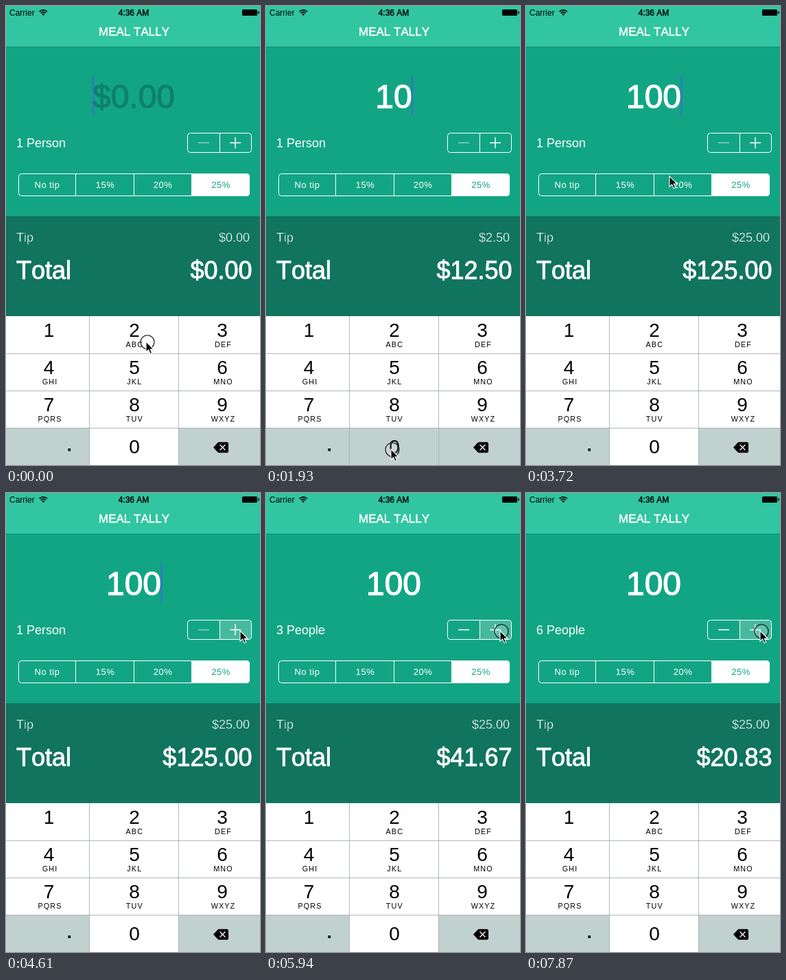
Write an HTML page that moves like this. It is 370 px wide and 666 px high and loops after 8 s.

```html
<!DOCTYPE html>
<html lang="en">
<head>
<meta charset="utf-8">
<title>Tip calculator</title>
<style>
html, body { margin: 0; width: 100%; height: 100%; overflow: hidden; background: #12a584; }
svg { display: block; width: 370px; height: 666px; }
text { font-family: "Liberation Sans", Arial, sans-serif; font-kerning: none; white-space: pre; }
.w { fill: #fff; }
.mid { text-anchor: middle; }
.end { text-anchor: end; }
.medium { stroke: #fff; paint-order: stroke; }
.light { fill: #fff; stroke: #10745e; stroke-width: .35px; font-size: 18px; }
.big { font-size: 36px; stroke-width: .9px; }
.seg { font-size: 13px; letter-spacing: .5px; }
.digit { font-size: 28px; }
.abc { font-size: 10.8px; letter-spacing: 1.1px; }
</style>
</head>
<body>
<svg viewBox="0 0 370 666">
  <rect width="370" height="666" fill="#12a584"/>
  <rect width="370" height="59" fill="#32c5a1"/>
  <rect y="59" width="370" height="1" fill="#0d8b6d"/>

  <text x="5" y="14" font-size="12">Carrier</text>
  <g fill="none" stroke="#000" stroke-width="1.7">
    <path d="M48.6 8.2a8 8 0 0 1 11.4 0M50.7 10.5a5 5 0 0 1 7.2 0"/>
    <path d="M54.3 14l-2-2.1a2.9 2.9 0 0 1 4 0z" fill="#000" stroke="none"/>
  </g>
  <text class="mid" x="186" y="13.7" font-size="12" stroke="#000" stroke-width=".4">4:36 AM</text>
  <rect x="344" y="5" width="22" height="9" rx="1.5"/>
  <path d="M367 7.5q2 0 2 2t-2 2z"/>
  <text class="w mid medium" x="186.5" y="43" font-size="17" stroke-width=".5">MEAL TALLY</text>

  <text id="amount" class="mid" x="186" y="147.5" font-size="48" stroke-width="1.2"></text>
  <rect id="caret" y="101" width="2" height="58" fill="#3a6fd0"/>

  <text id="people" class="w" x="15" y="205" font-size="18"></text>
  <path id="plusHit" d="M311 184.5h42.5a4 4 0 0 1 4 4v20a4 4 0 0 1-4 4H311z" fill="#fff" opacity=".22"/>
  <g fill="none" stroke="#fff">
    <rect x="264.5" y="184.5" width="93" height="28" rx="4"/>
    <path d="M311.5 184.5v28"/>
    <path id="minus" d="M280 198.5h16" stroke-width="1.5"/>
    <path d="M326 198.5h16M334 190.5v16" stroke-width="1.5"/>
    <rect x="18.5" y="243.5" width="336" height="32" rx="4"/>
    <path d="M101.5 243.5v32M186.5 243.5v32"/>
    <path d="M270.5 243.5h80a4 4 0 0 1 4 4v24a4 4 0 0 1-4 4h-80z" fill="#fff"/>
  </g>
  <g class="w mid seg">
    <text x="60" y="264">No tip</text>
    <text x="144.5" y="264">15%</text>
    <text x="228.5" y="264">20%</text>
    <text x="313" y="264" fill="#12a584">25%</text>
  </g>

  <rect y="305" width="370" height="145" fill="#10745e"/>
  <text class="light" x="15" y="341.5">Tip</text>
  <text id="tip" class="light end" x="355" y="341.5"></text>
  <text class="w medium big" x="15" y="396">Total</text>
  <text id="total" class="w medium big end" x="358.5" y="396"></text>

  <g id="pad"></g>

  <circle id="ring" r="10" fill="#fff" fill-opacity=".15" stroke="#000" stroke-width="1.1"/>
  <path id="arrow" d="M0 0V15.2L3.6 11.9L6.1 17.6L8.6 16.5L6.2 11H11z" stroke="#fff" stroke-width="1.1"/>
</svg>
<script>
const LOOP = 8000, TICK = 148.5;
const GREY = "#c0d1d0", PALE = "#0f8168";
const $ = id => document.getElementById(id);

function buildPad() {
  const edges = [0, 121, 251, 370], mids = [62.5, 187, 315];
  const letters = ["", "ABC", "DEF", "GHI", "JKL", "MNO", "PQRS", "TUV", "WXYZ"];
  let s = "";
  const key = (col, row, fill, id) =>
    `<rect id="${id}" x="${edges[col]}" y="${450 + 54 * row}" width="${edges[col + 1] - edges[col]}" height="54" fill="${fill}"/>`;
  const digit = (n, col, row) =>
    `<text class="mid digit" x="${mids[col]}" y="${(row < 3 ? 480 : 487) + 54 * row}">${n}</text>`;
  letters.forEach((abc, i) => {
    const col = i % 3, row = Math.floor(i / 3);
    s += key(col, row, "#fff", "key" + (i + 1)) + digit(i + 1, col, row)
      + `<text class="mid abc" x="${mids[col] + (col === 1 ? .3 : 1.5)}" y="${495 + 54 * row}">${abc}</text>`;
  });
  s += key(0, 3, GREY, "keyDot") + key(1, 3, "#fff", "key0") + key(2, 3, GREY, "keyDel") + digit(0, 1, 3);
  s += `<rect x="90.5" y="642" width="3.6" height="3.8"/>
    <path d="M302 640.5L308.5 633.6Q309.3 632.8 310.5 632.8H321.5Q324 632.8 324 635.3V645.7Q324 648.2 321.5 648.2H310.5Q309.3 648.2 308.5 647.4z"/>
    <path d="M311.5 636.5l8 8m0-8l-8 8" stroke="#fff" stroke-width="1.3"/>
    <path d="M0 504.5H370M0 558.5H370M0 612.5H370M121.5 450V666M251.5 450V666" stroke="#a9b0b0" stroke-width=".9"/>`;
  $("pad").innerHTML = s;
}

// Pointer path: tick, x, y
const path = [
  [0, 204, 487], [1, 150, 484], [3, 62, 478], [4, 62, 478], [6, 122, 505],
  [8, 170, 587], [9, 182, 640], [10, 182, 643], [20, 182, 643], [21, 152, 440],
  [22, 185, 300], [24, 185, 300], [25, 209, 247], [28, 290, 215], [30, 341, 200], [54, 341, 200]
];
const caretOff = [[19, 21], [26, 29], [33, 35], [39, 42], [46, 48], [52, 54]];
const typed = [4, 11, 15];
const added = [32, 37, 41, 45, 49];
const plusDown = [31, 36, 40, 44, 48, 53];
const oneDown = [3, 4], zeroDown = [10, 11, 13, 14];

const countUpTo = (list, k) => list.filter(n => n <= k).length;
const money = n => "$" + n.toFixed(2);
const show = (id, on) => $(id).setAttribute("visibility", on ? "visible" : "hidden");

function pointer(k) {
  const i = Math.max(1, path.findIndex(p => p[0] >= k));
  const [a, x0, y0] = path[i - 1], [b, x1, y1] = path[i];
  const u = (k - a) / (b - a);
  return [x0 + (x1 - x0) * u, y0 + (y1 - y0) * u];
}

function draw(t) {
  // The screen refreshes in even ticks
  const k = Math.min(53, Math.floor((t + 8) / TICK));
  const digits = "100".slice(0, countUpTo(typed, k));
  const people = 1 + countUpTo(added, k);
  const bill = Number(digits);

  const amount = $("amount");
  amount.textContent = digits || "$0.00";
  amount.setAttribute("fill", digits ? "#fff" : PALE);
  amount.setAttribute("stroke", digits ? "#fff" : PALE);
  const edge = digits ? 186 + digits.length * 13.35 : 126.5;
  $("caret").setAttribute("x", edge - .6);
  show("caret", !caretOff.some(([a, b]) => k >= a && k < b));

  $("people").textContent = people + (people > 1 ? " People" : " Person");
  $("minus").setAttribute("opacity", people > 1 ? 1 : .5);
  $("tip").textContent = money(bill * .25);
  $("total").textContent = money(bill * 1.25 / people);

  show("plusHit", plusDown.includes(k));
  $("key1").setAttribute("fill", oneDown.includes(k) ? GREY : "#fff");
  $("key0").setAttribute("fill", zeroDown.includes(k) ? GREY : "#fff");

  const [x, y] = pointer(k);
  $("arrow").setAttribute("transform", `translate(${x} ${y})`);
  $("ring").setAttribute("transform", `translate(${x + 2} ${y + .8})`);
  show("ring", k === 0 || [...oneDown, ...zeroDown, ...plusDown.slice(1)].includes(k));
}

buildPad();
const start = performance.now();
function frame() {
  draw((performance.now() - start) % LOOP);
  requestAnimationFrame(frame);
}
frame();
</script>
</body>
</html>
```
